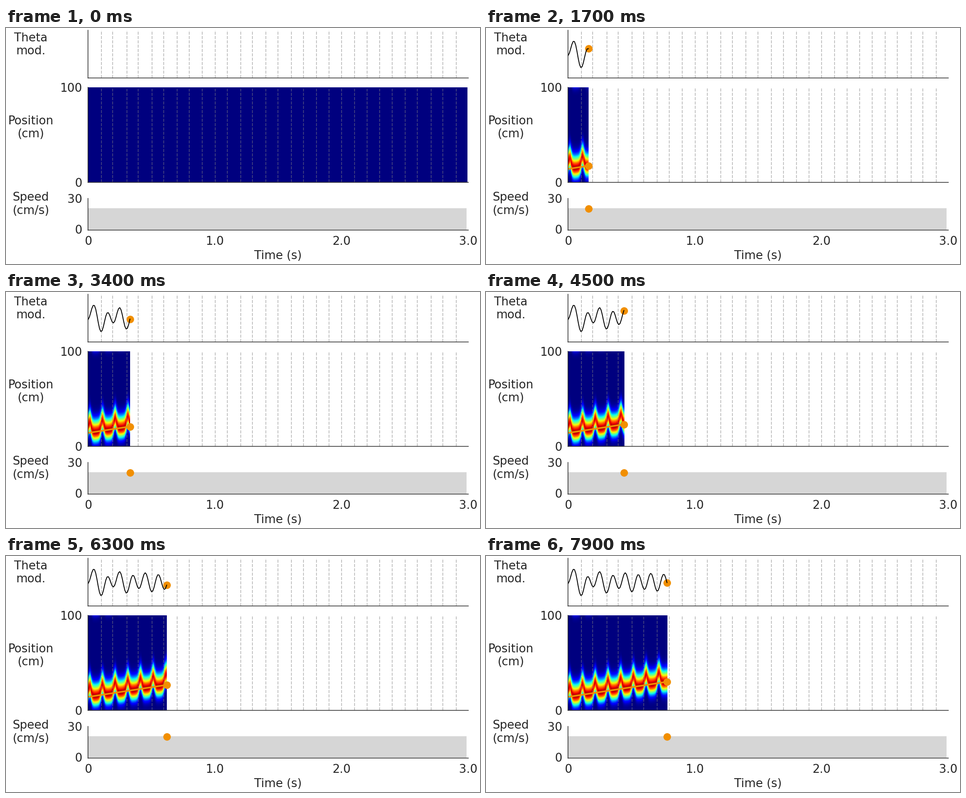
Animation of 1058 by 529 pixels, one loop 8000 ms. Source, as a matplotlib script:

```python
import matplotlib.pyplot as plt
import numpy as np
from matplotlib.animation import FuncAnimation

W, H = 1058, 529
PT = 0.72  # points per pixel at 100 dpi
LEFT, RIGHT = 183.3, 1031.8
INK, ORANGE = "#262626", "#f18f01"
FRAMES, INTERVAL = 80, 100
DT, STEPS = 0.01, 300
SPEED = 20.5

plt.rcParams["font.family"] = "DejaVu Sans"
fig = plt.figure(figsize=(W / 100, H / 100), dpi=100, facecolor="white")


def panel(top, bottom, ylim):
    ax = fig.add_axes([LEFT / W, 1 - bottom / H, (RIGHT - LEFT) / W, (bottom - top) / H])
    ax.set(xlim=(0, 3), ylim=ylim, xticks=[], yticks=[])
    ax.patch.set_visible(False)
    for side, spine in ax.spines.items():
        spine.set_visible(side in ("left", "bottom"))
        spine.set_color(INK)
        spine.set_linewidth(1.5 * PT)
    return ax


def label(x, y, text, ha="center"):
    fig.text(x / W, 1 - y / H, text, ha=ha, va="baseline", color=INK, fontsize=26 * PT)


def dot(ax):
    return ax.plot([], [], "o", color=ORANGE, ms=16.8 * PT, mew=0, zorder=2.2)[0]


def theta_wave(t):
    """10 Hz rhythm with a slower ripple that dies away."""
    ripple = 0.36 * np.exp(-t / 0.3) * np.cos(2 * np.pi * (t - 0.02) / 0.2)
    return ripple - 0.35 * np.cos(2 * np.pi * t / 0.1005)


def position(t):
    return 14.2 + 20.4 * t


def decoded(t):
    """Position probability on a circular track, sweeping ahead once per cycle."""
    y = np.linspace(0, 100, 200)[:, None]
    bump = np.exp(2.2 * (np.cos(2 * np.pi * (t - 0.017) / 0.1) - 1))
    centre = position(t) - 1 + 12 * bump
    gap = (y - centre + 50) % 100 - 50
    width = np.where(gap > 0, 8.7, 6.9)
    return (0.96 - 0.04 * bump) * np.exp(-0.5 * (gap / width) ** 2)


theta_ax = panel(5.2, 112.1, (-1, 1))
pos_ax = panel(133.1, 346.1, (0, 100))
speed_ax = panel(382, 453.4, (0, 30))

for y, first, second in [(29.5, "Theta", "mod."), (216, "Position", "(cm)"),
                         (387.3, "Speed", "(cm/s)")]:
    label(55.5, y, first)
    label(55.5, y + 29.3, second)
for y, text in [(143, "100"), (355.5, "0"), (392, "30"), (461, "0")]:
    label(170, y, text, "right")
for i, text in enumerate(["0", "1.0", "2.0", "3.0"]):
    label(LEFT + i * (RIGHT - LEFT) / 3, 486.3, text)
label(607.5, 518.5, "Time (s)")

# Theta cycle boundaries: evenly spaced with a beating wobble
cycle = np.arange(29)
wobble = np.abs(np.cos(np.pi * cycle / 38)) * np.cos(2 * np.pi * 6 / 13 * (cycle - 1))
for t in 0.0993 + 0.1001 * cycle - 0.007 * wobble:
    for ax in (theta_ax, pos_ax):
        ax.axvline(t, color="gray", alpha=0.5, ls="--", lw=1.83 * PT, zorder=1)

time = np.arange(FRAMES) * DT
theta, pos, heat = theta_wave(time), position(time), decoded(time)
blank = np.zeros((200, STEPS))


def heat_extent(columns):
    return -0.008, columns * DT - 0.008, 0, 100


speed_ax.fill_between([0, 2.987], 0.4, SPEED + 0.2, color="#d6d6d6", lw=0, zorder=1)
image = pos_ax.imshow(blank, cmap="jet", vmin=0, vmax=1, origin="lower", aspect="auto",
                      interpolation="hanning", extent=heat_extent(STEPS), zorder=0)
pos_ax.set(xlim=(0, 3), ylim=(0, 100))
wave, = theta_ax.plot([], [], color="black", lw=1.9 * PT, zorder=2.3)
path, = pos_ax.plot([], [], color=ORANGE, lw=3.6 * PT, zorder=2)
theta_dot, pos_dot, speed_dot = dot(theta_ax), dot(pos_ax), dot(speed_ax)


def update(n):
    image.set_data(heat[:, :n] if n else blank)
    image.set_extent(heat_extent(n or STEPS))
    wave.set_data(time[:n], theta[:n])
    path.set_data(time[:n], pos[:n])
    now = slice(max(n - 1, 0), n)
    theta_dot.set_data(time[now], theta[now])
    pos_dot.set_data(time[now], pos[now])
    speed_dot.set_data(time[now], np.full(len(time[now]), SPEED))
    return image, wave, path, theta_dot, pos_dot, speed_dot


anim = FuncAnimation(fig, update, frames=FRAMES, interval=INTERVAL,
                     init_func=lambda: update(0), repeat=True, repeat_delay=0)
plt.show()
```
